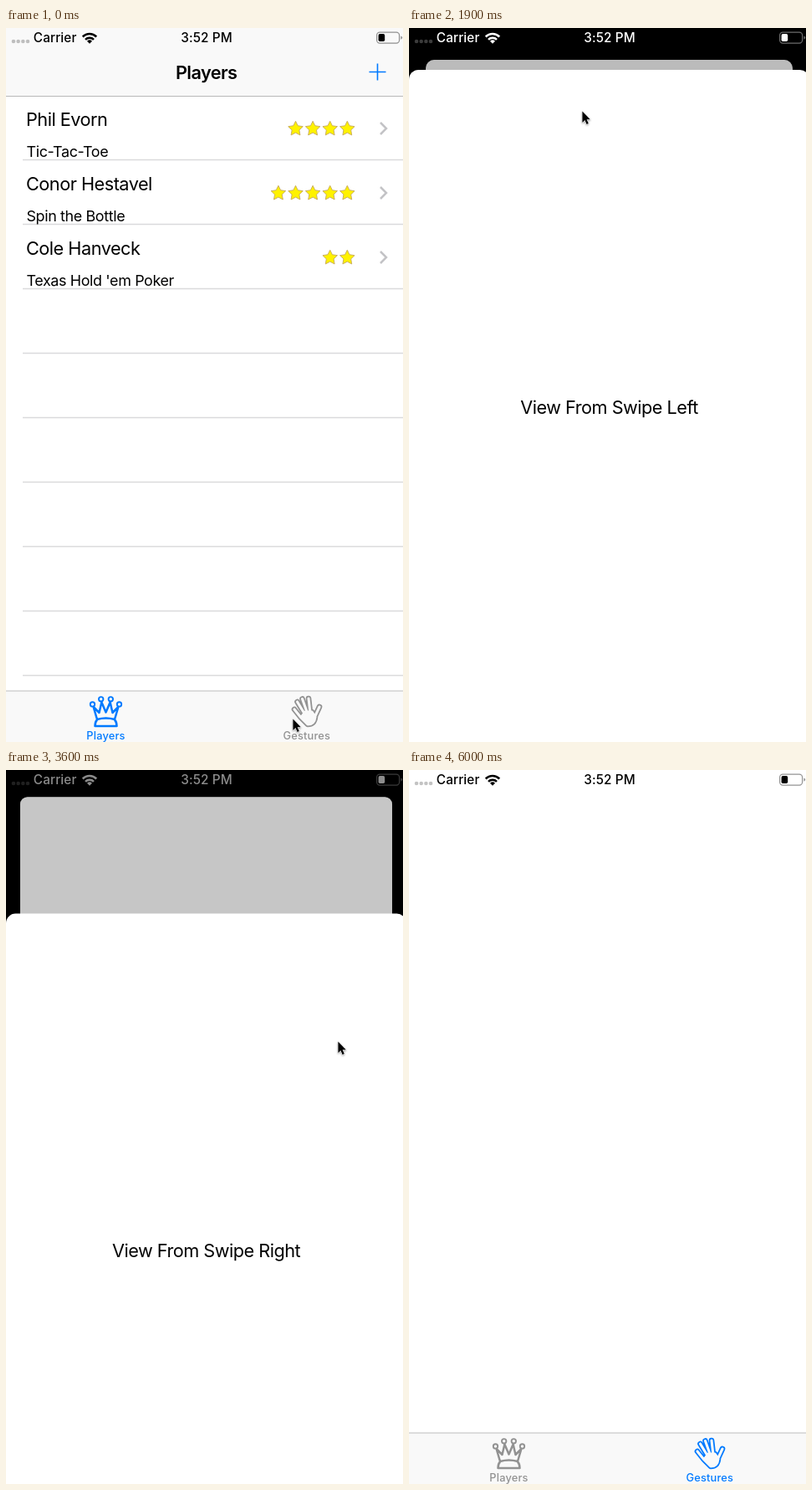
These frames come from a looping animation (475x853 px, 6200 ms). An HTML page:

```html
<!DOCTYPE html>
<html lang="en">
<head>
<meta charset="utf-8">
<title>Players and gestures</title>
<style>
  html, body { margin: 0; width: 100%; height: 100%; overflow: hidden; background: #000; }
  svg { display: block; width: 100vw; height: 100vh; }
  text { font-family: Inter, Roboto, "Liberation Sans", sans-serif; }
  .body { font-size: 21.7px; letter-spacing: -.5px; }
  .sub { font-size: 17.9px; letter-spacing: -.36px; }
  .title { font-size: 21.7px; font-weight: 600; letter-spacing: -.6px; }
  .small { font-size: 15.3px; font-weight: 500; letter-spacing: .12px; }
  .tab { font-size: 12.8px; font-weight: 500; letter-spacing: .2px; fill: currentColor; }
  .mid { text-anchor: middle; }
  .line { fill: none; stroke: currentColor; stroke-linejoin: round; }
  .bar { color: #f9f9f9; fill: currentColor; }
  .hand { fill: currentColor; stroke: currentColor; stroke-linejoin: round; stroke-linecap: round; }
  #cursor { filter: drop-shadow(0 1px 1px rgba(0, 0, 0, .4)); }
</style>
</head>
<body>
<svg viewBox="0 0 475 853" preserveAspectRatio="none">
  <defs>
    <path id="hand" d="M353 824L358 817H366L370 823Q369 832 361 832ZL345 814M357 819L348.5 805M360 817L354.5 801.5M364 818L362 801M369 824L375 811"/>
  </defs>
  <rect width="475" height="853" fill="#000"/>

  <g id="card">
    <rect id="page" width="479" height="853" fill="#fff"/>
    <g id="list">
      <rect class="bar" width="479" height="81"/>
      <path d="M0 81.5H479" stroke="#b8b8b8"/>
      <text class="title mid" x="239.6" y="61">Players</text>
      <path d="M434.5 52.5H454.5M444.5 42.5V62.5" stroke="#007aff" stroke-width="1.6"/>
      <g id="rows"></g>
    </g>
    <rect class="bar" y="792" width="479" height="61"/>
    <path d="M0 792H479" stroke="#bdbdbd" stroke-width="1.2"/>
    <g id="tabPlayers">
      <path class="line" stroke-width="2.5" d="M104.6 811L109 826Q119.5 823 130 826L134.4 811L127.5 818L124.6 805.5L119.5 817.5L114.4 805.5L111.5 818ZM109 826.5Q106.5 829 106.5 834H132.5Q132.5 829 130 826.5"/>
      <g id="balls" class="line" stroke-width="1.9"></g>
      <text class="tab mid" x="119.5" y="850">Players</text>
    </g>
    <g id="tabGestures">
      <use href="#hand" class="hand" stroke-width="6.6"/>
      <use href="#hand" class="hand bar" stroke-width="3.1"/>
      <text class="tab mid" x="359.8" y="850">Gestures</text>
    </g>
    <rect id="dim" width="479" height="853" fill="#000"/>
  </g>

  <g id="status" fill="currentColor">
    <g id="dots" opacity=".23"></g>
    <text class="small" x="32.8" y="17">Carrier</text>
    <path class="line" stroke-width="2.6" d="M91.8 10.5A11.4 11.4 0 0 1 108.2 10.5M95 13.8A7 7 0 0 1 105 13.8"/>
    <path d="M100 18.8L97 15.7A4.3 4.3 0 0 1 103 15.7Z"/>
    <text class="small mid" x="240" y="17">3:52 PM</text>
    <g opacity=".42">
      <rect class="line" x="443.6" y="5.1" width="27" height="13" rx="3.6" stroke-width="1.2"/>
      <path d="M472.4 9.4Q474.2 10 474.2 11.6T472.4 13.8Z"/>
    </g>
    <rect x="445.6" y="7.1" width="7.6" height="9" rx="1.8"/>
  </g>

  <g id="sheet">
    <rect width="479" height="870" rx="11.5" fill="#fff"/>
    <text id="label" class="body mid" x="239.6" y="410.5"></text>
  </g>

  <path id="cursor" d="M.4.6V14L3.4 11.1L5.6 16.1L7.8 15.1L5.6 10.3H9.8Z" stroke="#fff" stroke-width="1" paint-order="stroke"/>
</svg>

<script>
const LOOP = 6200, STEP = 100, BOTTOM = 853, TOP = 50, RATE = 21;
const $ = id => document.getElementById(id);
const smooth = v => (v = Math.min(1, Math.max(0, v)), v * v * (3 - 2 * v));

// Each visit: sheet rises at `show`, follows the cursor from `grab`, falls at `drop`.
const visits = [
  { show: 1128, grab: 2000, drop: 2600, reach: 68, text: "View From Swipe Left" },
  { show: 3440, grab: 4100, drop: 4700, reach: 111.5, text: "View From Swipe Right" }
];

// Eased cursor moves, each from wherever the last one ended.
const home = { x: 343, y: 825 };
const moves = [
  { from: 500, to: 900, x: 372, y: 478 },
  { from: 900, to: 1200, x: 91, y: 466 },
  { from: 1200, to: 1900, x: 207, y: 99 },
  { from: 2200, to: 2650, x: 217, y: 723 },
  { from: 2700, to: 3100, x: 95, y: 380 },
  { from: 3100, to: 3600, x: 397, y: 324 },
  { from: 3600, to: 4300, x: 340, y: 141 },
  { from: 4512, to: 4772, x: 340, y: 704 },
  { from: 4800, to: 5400, x: 350, y: 900 }
];

function cursorAt(t) {
  let { x, y } = home;
  for (const m of moves) {
    const k = smooth((t - m.from) / (m.to - m.from));
    x += (m.x - x) * k;
    y += (m.y - y) * k;
  }
  return { x, y };
}

// Critically damped spring: 1 at the start, settling to 0.
function spring(ms) {
  const u = RATE * Math.max(0, ms) / 1000;
  return (1 + u) * Math.exp(-u);
}

function sheetAt(t, v) {
  if (t < v.show) return BOTTOM;
  if (t < v.grab) return TOP + (BOTTOM - TOP) * spring(t - v.show);
  const held = Math.max(TOP, cursorAt(Math.min(t, v.drop)).y - v.reach);
  if (t <= v.drop) return held;
  const y = BOTTOM - (BOTTOM - held) * spring(t - v.drop);
  return y > 848 ? BOTTOM : y;
}

const circle = (x, y, r) => `<circle cx="${x}" cy="${y}" r="${r}"/>`;

function star(cx, cy) {
  const pts = Array.from({ length: 10 }, (_, i) => {
    const r = i % 2 ? 4.6 : 9.2, a = (i * 36 - 90) * Math.PI / 180;
    return `${cx + r * Math.cos(a)},${cy + r * Math.sin(a)}`;
  });
  return `<polygon points="${pts.join(" ")}" fill="#fff200" stroke="#cbb060" stroke-linejoin="round"/>`;
}

function build() {
  $("dots").innerHTML = [0, 1, 2, 3].map(i => circle(9 + i * 5.67, 16, 2.3)).join("");
  $("balls").innerHTML = [-16, -5.8, 5.8, 16].map(d => circle(119.5 + d, 798.3 + Math.abs(d) * .6, 2.7)).join("");

  const players = [
    ["Phil Evorn", "Tic-Tac-Toe", 4],
    ["Conor Hestavel", "Spin the Bottle", 5],
    ["Cole Hanveck", "Texas Hold 'em Poker", 2]
  ];
  let out = "";
  for (let i = 0; i < 9; i++) {
    const y = i * 77;
    out += `<path d="M20 ${y + 157.5}H479" stroke="#dadadc" stroke-width="1.3"/>`;
    if (!players[i]) continue;
    const [name, game, stars] = players[i];
    out += `<text class="body" x="24" y="${y + 117}">${name}</text>`
      + `<text class="sub" x="24.5" y="${y + 154}">${game}</text>`
      + `<path d="M448 ${y + 113}l7 7l-7 7" fill="none" stroke="#c3c3c6" stroke-width="2.5"/>`;
    for (let s = 0; s < stars; s++) out += star(408.3 - s * 20.6, y + 120.5);
  }
  $("rows").innerHTML = out;
}

function draw(t) {
  const first = t < 100;
  const v = t < 3000 ? visits[0] : visits[1];
  const y = sheetAt(t, v);
  const p = (BOTTOM - y) / (BOTTOM - TOP);
  const tone = 255 * smooth((t - v.show) / 300) * (1 - smooth((t - v.drop) / 300));
  const cursor = cursorAt(t);

  $("list").style.display = first ? "" : "none";
  $("tabPlayers").style.color = first ? "#007aff" : "#929292";
  $("tabGestures").style.color = first ? "#929292" : "#007aff";
  $("card").setAttribute("transform", `translate(${20 * p} ${38 * p}) scale(${1 - 40 * p / 479})`);
  for (const id of ["page", "dim"]) $(id).setAttribute("rx", 11 * p);
  $("dim").setAttribute("opacity", 0.265 * p);
  $("status").style.color = `rgb(${tone},${tone},${tone})`;
  $("sheet").style.display = p > 0 ? "" : "none";
  $("sheet").setAttribute("transform", `translate(0 ${y})`);
  $("label").textContent = v.text;
  $("cursor").setAttribute("transform", `translate(${cursor.x} ${cursor.y})`);
}

function tick() {
  const t = performance.now() % LOOP;
  draw(Math.floor(t / STEP) * STEP);
  requestAnimationFrame(tick);
}

build();
tick();
</script>
</body>
</html>
```
